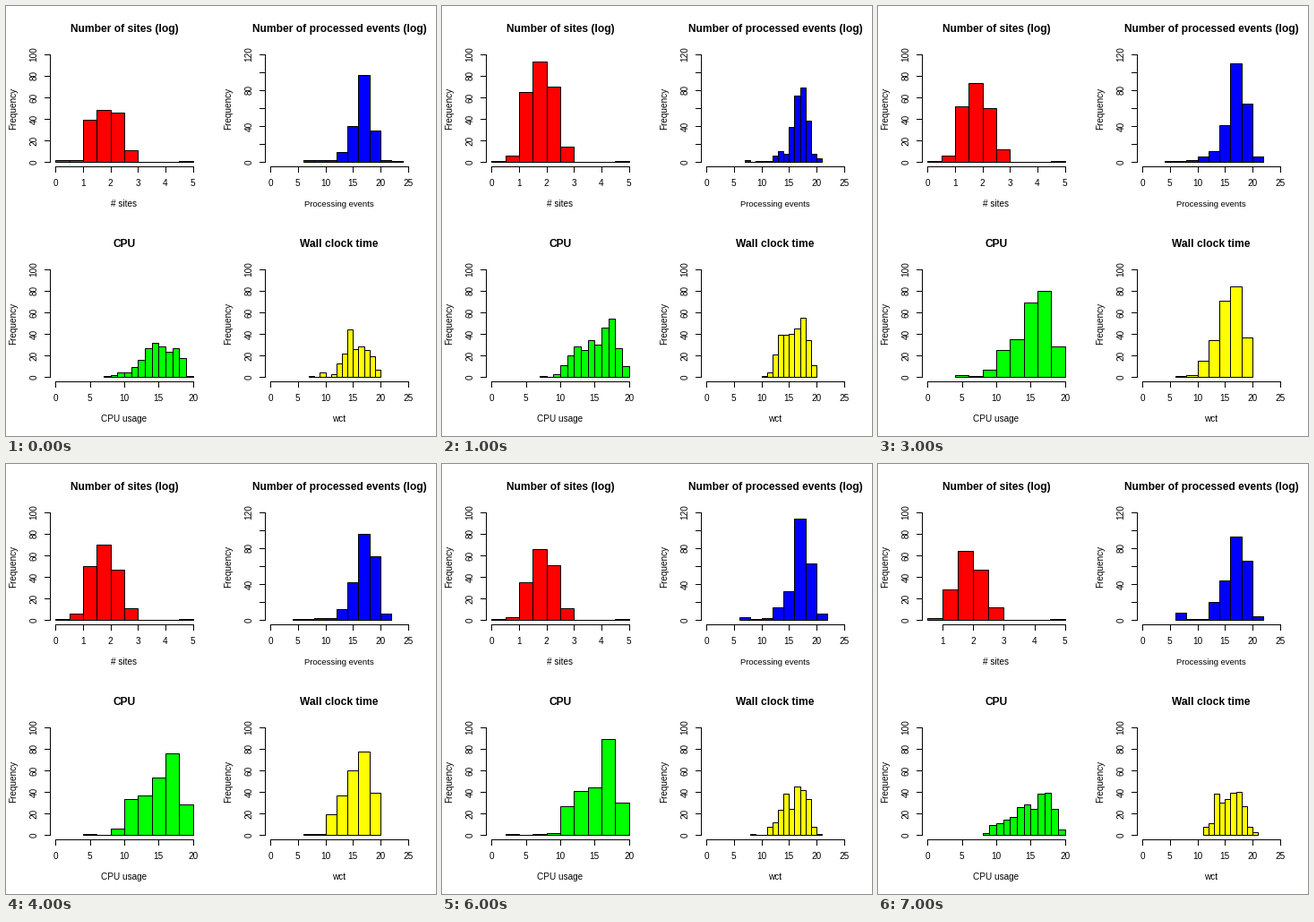
A matplotlib script that plays this animation: 480 by 480 pixels, repeating every 8000 ms.

```python
import matplotlib.pyplot as plt
from matplotlib.animation import FuncAnimation
from matplotlib.patches import Rectangle

SIZE, DPI = 480, 100
PX = 72 / DPI                 # points per pixel
LINE = 11.95                  # height of one margin line
PLOT_W, PLOT_H = 165.9, 130.0
LEFT, TOP = 4.1 * LINE, 4.1 * LINE
PAD = 0.04 / 1.08             # axis padding as a share of the plot box

plt.rcParams["font.family"] = "Liberation Sans"

# Each row: first bin edge, bin width, counts.
SITES = [
    (0, .5, [2, 2, 39, 48, 46, 11, 0, 0, 0, 1]),
    (0, .5, [1, 6, 65, 93, 70, 14, 0, 0, 0, 1]),
    (0, .5, [1, 6, 53, 76, 53, 13, 0, 0, 0, 1]),
    (0, .5, [1, 6, 52, 73, 50, 12, 0, 0, 0, 1]),
    (0, .5, [1, 6, 50, 70, 47, 11, 0, 0, 0, 1]),
    (0, .5, [1, 4, 42, 68, 49, 11, 0, 0, 0, 1]),
    (0, .5, [1, 3, 35, 66, 51, 11, 0, 0, 0, 1]),
    (.5, .5, [2, 28, 64, 47, 12, 0, 0, 0, 1]),
]
EVENTS = [
    (6, 2, [2, 2, 2, 11, 40, 97, 35, 2, 1]),
    (7, 1, [2, 0, 1, 1, 1, 7, 12, 9, 39, 74, 83, 46, 9, 4]),
    (4, 2, [1, 1, 1, 10, 11, 39, 124, 59, 5]),
    (4, 2, [1, 1, 2, 6, 12, 41, 110, 65, 6]),
    (4, 2, [1, 1, 2, 2, 12, 42, 96, 71, 7]),
    (6, 2, [2, 1, 2, 13, 37, 104, 67, 7]),
    (6, 2, [3, 1, 2, 14, 32, 113, 63, 7]),
    (6, 2, [8, 1, 1, 20, 44, 93, 66, 4]),
]
CPU = [
    (7, 1, [1, 2, 4, 4, 9, 16, 27, 32, 28, 23, 27, 18, 1]),
    (7, 1, [1, 0, 3, 11, 20, 28, 25, 34, 30, 46, 54, 27, 10]),
    (4, 2, [3, 1, 9, 16, 33, 85, 84, 28]),
    (4, 2, [2, 1, 7, 25, 35, 69, 80, 28]),
    (4, 2, [1, 0, 6, 33, 37, 53, 76, 28]),
    (4, 2, [1, 1, 4, 30, 39, 48, 83, 29]),
    (2, 2, [1, 0, 1, 2, 27, 41, 44, 89, 30]),
    (8, 1, [2, 9, 11, 14, 17, 26, 28, 24, 38, 39, 24, 5]),
]
WALL = [
    (7, 1, [1, 0, 4, 0, 3, 13, 22, 44, 26, 28, 25, 19, 7]),
    (10, 1, [1, 4, 21, 39, 39, 40, 45, 55, 34, 11]),
    (6, 1, [1, 1, 0, 3, 4, 7, 10, 21, 37, 45, 51, 41, 28, 7, 3]),
    (6, 2, [1, 2, 15, 34, 71, 84, 37]),
    (6, 2, [1, 1, 19, 37, 60, 77, 39]),
    (6, 2, [1, 1, 19, 36, 61, 82, 40]),
    (8, 1, [1, 0, 0, 8, 12, 23, 38, 24, 45, 42, 33, 8, 1]),
    (11, 1, [8, 11, 38, 30, 33, 39, 40, 27, 8, 3]),
]

# column, row, title, x label, label size, colour, x max, x step, y max, y label step, data
PANELS = [
    (0, 0, "Number of sites (log)", "# sites", 10, "#ff0000", 5, 1, 100, 20, SITES),
    (1, 0, "Number of processed events (log)", "Processing events", 9.5,
     "#0000ff", 25, 5, 120, 40, EVENTS),
    (0, 1, "CPU", "CPU usage", 10, "#00ff00", 20, 5, 100, 20, CPU),
    (1, 1, "Wall clock time", "wct", 10, "#ffff00", 25, 5, 100, 20, WALL),
]

fig = plt.figure(figsize=(SIZE / DPI, SIZE / DPI), dpi=DPI, facecolor="white")
ax = fig.add_axes([0, 0, 1, 1])


def stroke(xs, ys):
    ax.plot(xs, ys, color="black", lw=PX)


def label(x, y, text, size=10, turn=0, weight="normal"):
    ax.text(x, y, text, fontsize=size * PX, rotation=turn, weight=weight,
            ha="center", va="baseline", rotation_mode="anchor")


def draw_panel(col, row, title, xlabel, xsize, color,
               xmax, xstep, ymax, ylabel_step, data, i):
    left, top = LEFT + 240 * col, TOP + 240 * row
    bottom = top + PLOT_H
    start, width, counts = data[i]
    xmin = start if data is SITES else 0

    def px(v):
        return left + PLOT_W * (PAD + (v - xmin) / (xmax - xmin) / 1.08)

    def py(v):
        return bottom - PLOT_H * (PAD + v / ymax / 1.08)

    for k, n in enumerate(counts):
        x0, x1 = px(start + k * width), px(start + (k + 1) * width)
        if n:
            ax.add_patch(Rectangle((x0, py(n)), x1 - x0, py(0) - py(n),
                                   fc=color, ec="black", lw=PX))
        else:
            stroke([x0, x1], [py(0)] * 2)

    xticks = [v for v in range(0, xmax + 1, xstep) if v >= xmin]
    stroke([px(xticks[0]), px(xmax)], [bottom] * 2)
    for v in xticks:
        stroke([px(v)] * 2, [bottom, bottom + LINE / 2])
        label(px(v), bottom + 1.8 * LINE, str(v))

    stroke([left] * 2, [py(0), py(ymax)])
    for v in range(0, ymax + 1, 20):
        stroke([left - LINE / 2, left], [py(v)] * 2)
        if v % ylabel_step == 0:
            label(left - 1.2 * LINE, py(v), str(v), turn=90)

    mid = left + PLOT_W / 2
    label(mid, top - 20, title, 12, weight="bold")
    label(mid, bottom + 3.8 * LINE, xlabel, xsize)
    label(left - 3.2 * LINE, top + PLOT_H / 2, "Frequency", turn=90)


def draw(i):
    ax.clear()
    ax.axis("off")
    for panel in PANELS:
        draw_panel(*panel, i)
    ax.set_xlim(0, SIZE)
    ax.set_ylim(SIZE, 0)
    return []


anim = FuncAnimation(fig, draw, frames=8, interval=1000, init_func=lambda: [],
                     repeat=True, repeat_delay=0)
plt.show()
```
